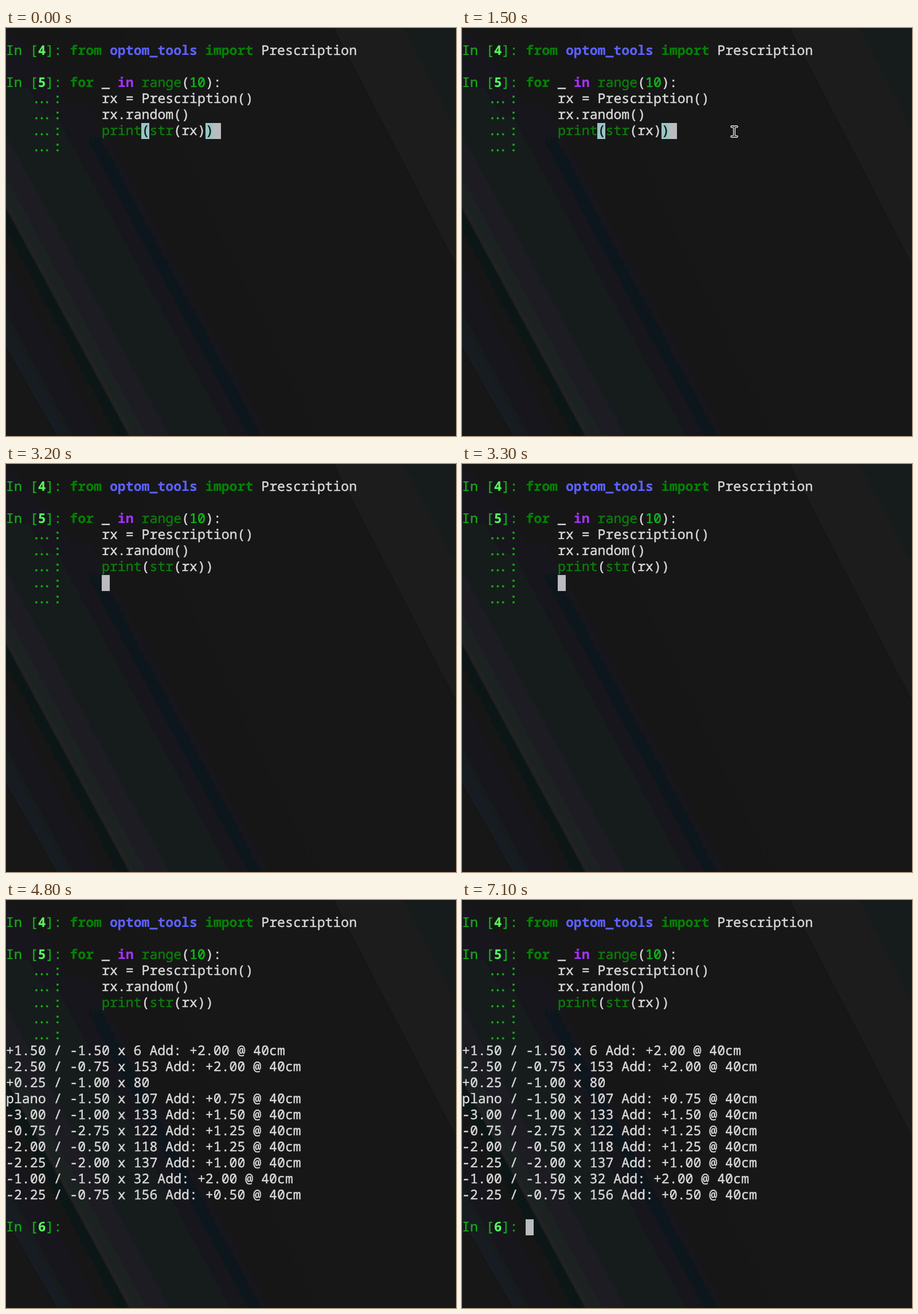
An HTML page for the animation above (7200 ms loop, 785 px wide and 713 px high).

```html
<!DOCTYPE html>
<html lang="en">
<head>
<meta charset="utf-8">
<title>Terminal session</title>
<style>
  html, body { margin: 0; width: 100%; height: 100%; overflow: hidden; background: #171717; }
  svg { display: block; }
  text {
    font: 500 23.2px "Noto Sans Mono", "DejaVu Sans Mono", monospace;
    font-variant-ligatures: none;
    text-rendering: geometricPrecision;
    white-space: pre;
    color: #d9d9d9;
  }
  text, tspan { fill: currentColor; stroke: currentColor; stroke-width: .45px; }
  .prompt { color: #17a81a; }
  .dots { stroke-width: .9px; }
  .count { color: #58f760; font-weight: 700; }
  .key { color: #058205; font-weight: 700; }
  .call { color: #0a7f0a; }
  .num { color: #12b31c; stroke-width: .7px; }
  .op { color: #a633f5; font-weight: 700; }
  .mod { color: #5c62ff; font-weight: 700; }
  .match { color: #121617; }
  .count, .key, .op, .mod { stroke-width: .15px; }
</style>
</head>
<body>
<svg width="785" height="713" viewBox="0 0 785 713">
  <defs>
    <linearGradient id="band" gradientUnits="userSpaceOnUse" x1="0" y1="315" x2="264" y2="172">
      <stop offset="0" stop-color="#202122"/>
      <stop offset=".1" stop-color="#1d1f20"/>
      <stop offset=".24" stop-color="#181c1f"/>
      <stop offset=".48" stop-color="#141a1e"/>
      <stop offset=".62" stop-color="#11171a"/>
      <stop offset=".86" stop-color="#121618"/>
      <stop offset="1" stop-color="#161717"/>
    </linearGradient>
    <linearGradient id="strip" gradientUnits="userSpaceOnUse" x1="0" y1="555" x2="100" y2="501">
      <stop offset="0" stop-color="#192024"/>
      <stop offset=".3" stop-color="#12181c"/>
      <stop offset="1" stop-color="#111416"/>
    </linearGradient>
    <linearGradient id="wedge" gradientUnits="userSpaceOnUse" x1="572" y1="0" x2="722" y2="-78">
      <stop offset="0" stop-color="#1d1e1f"/>
      <stop offset=".35" stop-color="#1b1d1f"/>
      <stop offset="1" stop-color="#171b1e"/>
    </linearGradient>
    <linearGradient id="shade" x1="0" y1="0" x2="0" y2="1">
      <stop offset="0" stop-color="#141617" stop-opacity=".7"/>
      <stop offset="1" stop-color="#141617" stop-opacity="0"/>
    </linearGradient>
    <filter id="soft"><feGaussianBlur stdDeviation="1.5"/></filter>
  </defs>
  <rect width="785" height="713" fill="#171717"/>
  <g filter="url(#soft)">
    <path d="M-9 -9H201L550 722H220L-9 298Z" fill="url(#band)"/>
    <path d="M-9 -9H201L310 220H-9Z" fill="url(#shade)"/>
    <path d="M-9 298L220 722H95L-9 539Z" fill="url(#strip)"/>
    <path d="M568 -9H794V429Z" fill="url(#wedge)"/>
  </g>
  <g id="screen"></g>
  <g id="pointer" fill="none" stroke-linecap="round" stroke-linejoin="round"></g>
</svg>
<script>
const LOOP = 7200, STEP = 100;
const CELL = 13.92, ROW = 28, LEFT = 0, TOP = 26, BASE = 21.4;
const NS = "http://www.w3.org/2000/svg";
const ENTER = 2800, RUN = 3400;

const screen = document.getElementById("screen");
const pointer = document.getElementById("pointer");

function add(parent, tag, attrs = {}, text = "") {
  const el = document.createElementNS(NS, tag);
  for (const k in attrs) el.setAttribute(k, attrs[k]);
  el.textContent = text;
  return parent.appendChild(el);
}

const group = () => add(screen, "g");
const colX = col => LEFT + col * CELL;
const rowY = row => TOP + row * ROW;
const show = (el, on) => { el.style.visibility = on ? "visible" : "hidden"; };

// Each part is plain text or [class, text].
function line(parent, row, parts, col = 0) {
  const el = add(parent, "text", { x: colX(col), y: rowY(row) + BASE });
  for (const part of parts) {
    const [cls, text] = Array.isArray(part) ? part : ["", part];
    add(el, "tspan", { class: cls }, text);
  }
}

function place(el, row, col) {
  el.setAttribute("x", Math.round(colX(col) - 0.5));
  el.setAttribute("y", rowY(row));
}

function block(parent, row, col, fill) {
  const el = add(parent, "rect", { width: 14, height: ROW, fill });
  place(el, row, col);
  return el;
}

const input = n => [["prompt", "In ["], ["count", n], ["prompt", "]: "]];

// Continuation prompt with the dots drawn close together.
function more(parent, row) {
  add(parent, "text", {
    class: "prompt dots", x: "46 55.4 64.8 83.1", y: rowY(row) + BASE
  }, "...:");
}

const base = group(), matched = group(), extra = group(), output = group();

line(base, 0, [...input("4"), ["key", "from "], ["mod", "optom_tools"], ["key", " import "], "Prescription"]);
line(base, 2, [...input("5"), ["key", "for "], "_ ", ["op", "in "], ["call", "range"], "(", ["num", "10"], "):"]);
line(base, 3, ["rx = Prescription()"], 12);
line(base, 4, ["rx.random()"], 12);
line(base, 5, [["call", "print"], "(", ["call", "str"], "(rx))"], 12);
for (let row = 3; row < 7; row++) more(base, row);
more(extra, 7);

for (const [col, ch] of [[17, "("], [25, ")"]]) {
  block(matched, 5, col, "#99c5c4");
  line(matched, 5, [["match", ch]], col);
}

const results = [
  "+1.50 / -1.50 x 6 Add: +2.00 @ 40cm",
  "-2.50 / -0.75 x 153 Add: +2.00 @ 40cm",
  "+0.25 / -1.00 x 80",
  "plano / -1.50 x 107 Add: +0.75 @ 40cm",
  "-3.00 / -1.00 x 133 Add: +1.50 @ 40cm",
  "-0.75 / -2.75 x 122 Add: +1.25 @ 40cm",
  "-2.00 / -0.50 x 118 Add: +1.25 @ 40cm",
  "-2.25 / -2.00 x 137 Add: +1.00 @ 40cm",
  "-1.00 / -1.50 x 32 Add: +2.00 @ 40cm",
  "-2.25 / -0.75 x 156 Add: +0.50 @ 40cm"
];
results.forEach((text, i) => line(output, 8 + i, [text]));
line(output, 19, input("6"));

const cursor = block(screen, 5, 26, "#bcbbbf");

// I-beam: a light outline around a dark core.
const beam = "M-4.6 -8.6H-2.4Q0 -8.6 0 -6.4V6.4Q0 8.6 -2.4 8.6H-4.6" +
  "M4.6 -8.6H2.4Q0 -8.6 0 -6.4M0 6.4Q0 8.6 2.4 8.6H4.6";
add(pointer, "path", { d: beam, stroke: "#eee", "stroke-width": 4.2 });
add(pointer, "path", { d: beam, stroke: "#191919", "stroke-width": 1.5 });

// Cursor places: start, row, column; blink times alternate on and off.
const places = [[0, 5, 26], [ENTER, 6, 12], [RUN, 19, 8]];
const blinks = [0, 800, 1500, 2300, ENTER, 4200, 4900, 5700, 6500];

// Pointer path: time, x, y.
const path = [[400, 586, 467], [600, 522, 305], [800, 469, 200.5], [1000, 471, 203], [1400, 475, 181], [ENTER, 475, 181]];

function along(t) {
  const i = path.findIndex(p => p[0] > t);
  if (i < 1) return null;
  const [t0, x0, y0] = path[i - 1], [t1, x1, y1] = path[i];
  const k = (t - t0) / (t1 - t0);
  return [x0 + (x1 - x0) * k, y0 + (y1 - y0) * k];
}

function render(time) {
  const t = Math.floor((time % LOOP) / STEP) * STEP;
  show(matched, t < ENTER);
  show(extra, t >= ENTER);
  show(output, t >= RUN);

  const [, row, col] = places.filter(p => p[0] <= t).pop();
  place(cursor, row, col);
  show(cursor, blinks.filter(b => b <= t).length % 2 === 1);

  const at = along(t);
  show(pointer, at);
  if (at) pointer.setAttribute("transform", `translate(${at})`);
}

function tick() {
  render(performance.now());
  requestAnimationFrame(tick);
}
tick();
</script>
</body>
</html>
```
